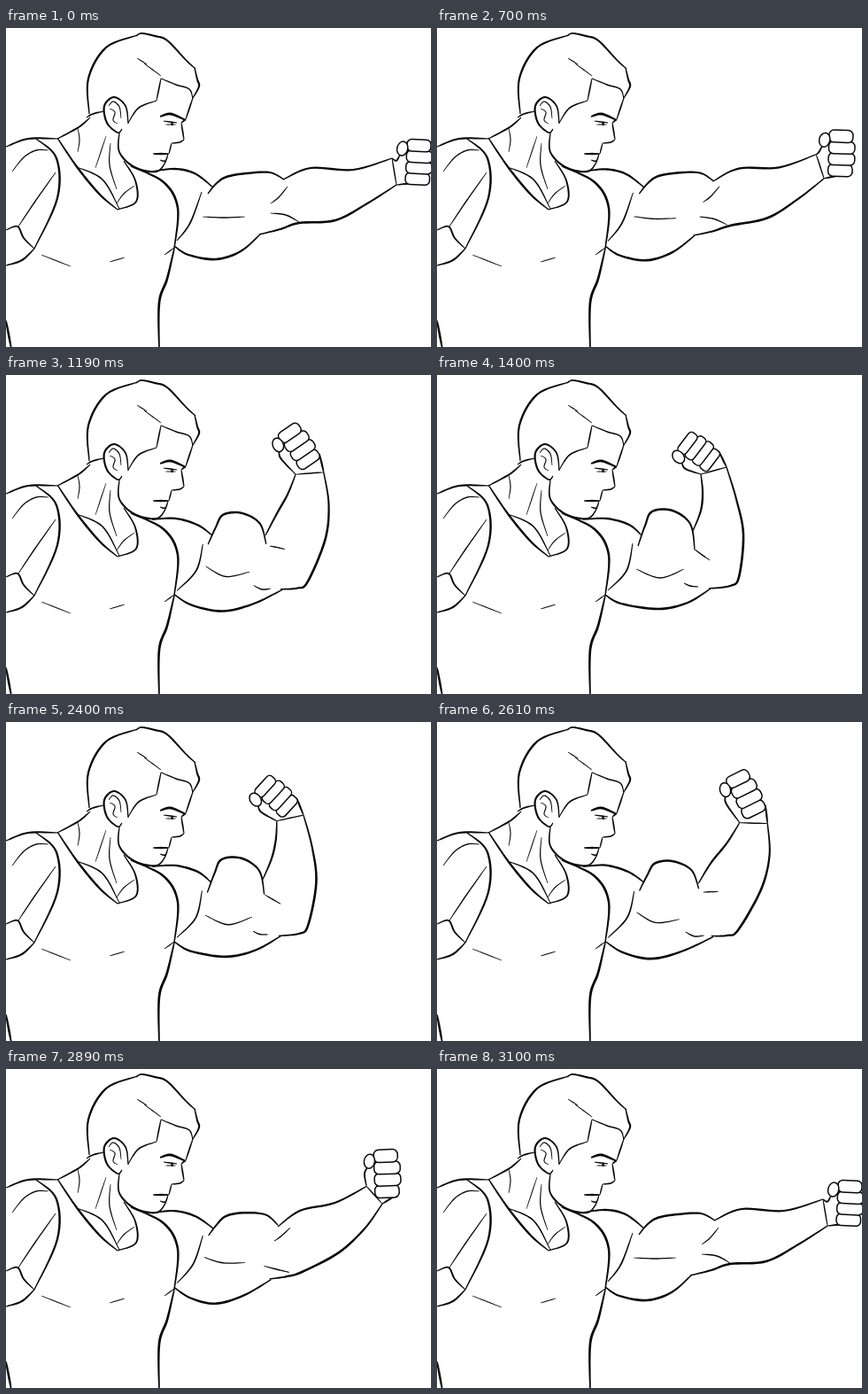
Write an HTML page with a canvas that moves like this. It is 480 by 360 pixels and loops after 3170 ms.

```html
<!DOCTYPE html>
<html lang="en">
<head>
<meta charset="utf-8">
<title>Arm flex</title>
<style>
html, body { margin: 0; width: 100%; height: 100%; overflow: hidden; background: #fff; }
canvas { display: block; width: 480px; height: 360px; }
</style>
</head>
<body>
<canvas id="stage" width="480" height="360"></canvas>
<script>
const ctx = document.getElementById('stage').getContext('2d');
const LOOP = 3170, STEP = 70, LAST = 11, INK = '#080808';

// Spline ribbon through a few points, thinner at both ends
function brush(w, ...p) {
  const n = p.length / 2, total = (n - 1) * 8;
  const at = (i, c) => p[2 * Math.max(0, Math.min(n - 1, i)) + c];
  const spot = (s, c) => {
    const i = Math.max(0, Math.min(n - 2, Math.floor(s))), u = s - i;
    const a = at(i - 1, c), b = at(i, c), d = at(i + 1, c), e = at(i + 2, c);
    return b + u * ((d - a) / 2 + u * (a - 2.5 * b + 2 * d - e / 2 + u * (1.5 * (b - d) + (e - a) / 2)));
  };
  const left = [], right = [];
  for (let j = 0; j <= total; j++) {
    const s = j / 8, x = spot(s, 0), y = spot(s, 1);
    const dx = spot(s + 0.02, 0) - spot(s - 0.02, 0), dy = spot(s + 0.02, 1) - spot(s - 0.02, 1);
    const half = w * (0.3 + 0.28 * Math.sin(Math.PI * j / total)) / (Math.hypot(dx, dy) || 1);
    left.push([x - dy * half, y + dx * half]);
    right.unshift([x + dy * half, y - dx * half]);
  }
  ctx.beginPath();
  left.concat(right).forEach(q => ctx.lineTo(...q));
  ctx.fillStyle = INK;
  ctx.fill();
}

function drawHead() {
  // Hair
  brush(2.1, 94,97, 93,57, 113,22, 149,8);
  brush(1.9, 147,9, 153,6, 168,9, 182,14, 203,36, 214,46);
  brush(1.9, 213,45, 216,58, 218,66, 211,79);
  brush(1.4, 175,57, 192,64, 207,69, 211,80);
  brush(1.4, 175,57, 170,82);
  brush(1.4, 170,82, 150,90, 138,107);
  brush(1, 148,34, 159,41);
  brush(1, 156,40, 175,54);
  brush(1.6, 91,101, 98,97, 110,94);
  // Ear
  brush(1.9, 138,108, 135,88, 122,78, 111,88, 114,107, 126,118, 131,114);
  brush(1.1, 116,88, 121,83, 128,89, 130,102);
  brush(1, 117,91, 123,95, 121,104, 126,108);
  // Brow, nose, mouth and jaw
  brush(1.5, 211,79, 203,103);
  brush(2.5, 174,100, 186,97, 203,104);
  brush(1.5, 203,103, 198,107);
  brush(1.5, 198,107, 201,126);
  brush(1.5, 201,126, 196,129, 187,130);
  brush(1.3, 187,130, 184,142);
  brush(2, 166,142, 184,142);
  brush(1.4, 183,142, 180,150, 174,149);
  brush(1.9, 181,150, 170,162, 145,157, 128,140, 128,118);
  brush(1.3, 178,105, 193,107);
  brush(2, 187,106, 188,110);
  brush(0.9, 180,109, 192,109);
}

function drawTorso() {
  // Neck and collar
  brush(1.7, 95,101, 82,112, 58,125);
  brush(1, 81,113, 83,126, 81,140);
  brush(0.9, 113,122, 101,158);
  brush(1.1, 118,130, 117,155, 125,182);
  brush(1.7, 133,150, 146,172, 147,196, 126,205);
  brush(2.1, 58,124, 81,158, 106,188, 126,205);
  brush(1.4, 80,157, 109,171, 128,204);
  brush(1, 125,198, 133,187, 145,178);
  // Near shoulder
  brush(1.9, 0,134, 25,125, 58,125);
  brush(2.1, 34,125, 57,147, 58,192, 32,249);
  brush(1.9, 32,249, 18,262, 0,268);
  brush(1.2, 48,138, 34,138, 20,146, 7,162);
  brush(1.2, 56,163, 32,197, 14,224);
  brush(1.7, 0,228, 13,224, 20,237, 32,249);
  // Chest and side
  brush(2.3, 141,156, 178,174, 194,203, 190,249);
  brush(2.5, 190,249, 182,283, 173,310, 173,364);
  brush(1, 40,256, 73,269);
  brush(1, 117,264, 134,259);
  brush(1, 179,256, 190,248);
  brush(2.2, 0,330, 6,362);
}

// The swing starts and ends slowly; each part has three key poses
const ease = k => k - 0.7 * Math.sin(2 * Math.PI * k / LAST);
const MID = ease(5);

function mix(u, a, b, c) {
  const wa = (u - MID) * (u - LAST) / (MID * LAST);
  const wb = u * (u - LAST) / (MID * (MID - LAST));
  const wc = u * (u - MID) / (LAST * (LAST - MID));
  return a.map((v, i) => v * wa + b[i] * wb + c[i] * wc);
}

const shoulder = [
  [165,162, 190,159, 213,164, 234,180],
  [165,163, 190,161, 215,168, 235,181],
  [165,163, 192,162, 217,169, 231,181]];
const biceps = [
  [228,187, 237,176, 249,168, 272,164, 298,163, 314,171],
  [229,189, 238,175, 248,163, 268,160, 290,166, 301,182],
  [227,193, 235,170, 243,154, 266,153, 286,168, 291,196]];
const triceps = [
  [190,246, 206,256, 237,261, 265,252, 287,233],
  [190,247, 210,260, 238,267, 272,258, 308,241],
  [190,248, 208,258, 250,264, 283,257, 309,241]];
const armpit = [
  [193,240, 208,220, 221,185],
  [193,243, 214,220, 223,190],
  [193,243, 214,221, 221,190]];
const muscle = [
  [222,213, 246,214, 270,213],
  [225,213, 245,223, 271,222],
  [225,219, 252,229, 279,219]];
const elbow = [
  [299,209, 316,211, 331,219],
  [285,232, 298,237, 310,237],
  [279,235, 286,238, 295,239]];
const crook = [
  [299,198, 308,191, 318,179],
  [304,192, 312,188, 321,183],
  [290,196, 298,202, 308,209]];
const foreTop = [
  [313,171, 344,158, 392,160, 436,147],
  [301,182, 321,160, 350,143, 376,121],
  [289,176, 298,153, 300,132, 298,112]];
const foreBottom = [
  [286,233, 310,227, 331,220, 372,217, 408,198, 441,177],
  [306,240, 323,239, 338,234, 374,198, 395,164, 403,131],
  [307,241, 331,238, 341,228, 346,180, 338,140, 327,104]];
// Centre, turn and finger thickness
const fist = [
  [467,151, 0.05, 12.5],
  [392,93, -0.2, 13.5],
  [296,85, -0.92, 10.5]];

function outline(draw) {
  ctx.beginPath();
  draw();
  ctx.fillStyle = '#fff';
  ctx.fill();
  ctx.strokeStyle = INK;
  ctx.lineWidth = 1.5;
  ctx.stroke();
}

function drawFist(u, top, bottom) {
  const [x, y, turn, thick] = mix(u, ...fist);
  const cos = Math.cos(turn), sin = Math.sin(turn);
  const place = (a, b) => [x + a * cos - b * sin, y + a * sin + b * cos];
  brush(1.7, ...place(-22, -8), ...place(-26, 0), ...top);
  brush(1.9, ...place(13, thick * 1.7), ...bottom);
  brush(1.3, ...top, ...bottom);
  ctx.save();
  ctx.translate(x, y);
  ctx.rotate(turn);
  for (let i = 3; i >= 0; i--) {
    const reach = 27 + 3 * Math.sin(i);
    outline(() => ctx.roundRect(-15, (i - 2) * thick, reach, thick + 1, thick * 0.42));
  }
  outline(() => ctx.ellipse(-20, -14, 6, 8, 0.2, 0, 2 * Math.PI));
  ctx.restore();
}

function drawArm(u) {
  const top = mix(u, ...foreTop), bottom = mix(u, ...foreBottom);
  const parts = [[2.1, shoulder], [2.2, biceps], [2.3, triceps], [1.5, armpit],
    [1.2, muscle], [1.3, elbow], [1.2, crook]];
  parts.forEach(([w, poses]) => brush(w, ...mix(u, ...poses)));
  brush(2, ...top);
  brush(2.3, ...bottom);
  drawFist(u, top.slice(-2), bottom.slice(-2));
}

function stepAt(t) {
  if (t < 700) return 0;
  if (t < 2400) return Math.min(LAST, 1 + Math.floor((t - 700) / STEP));
  return Math.max(0, LAST - 1 - Math.floor((t - 2400) / STEP));
}

let shown = -1;
function frame() {
  const k = stepAt(performance.now() % LOOP);
  if (k !== shown) {
    shown = k;
    ctx.fillStyle = '#fff';
    ctx.fillRect(0, 0, 480, 360);
    drawHead();
    drawTorso();
    drawArm(ease(k));
  }
  requestAnimationFrame(frame);
}
frame();
</script>
</body>
</html>
```
